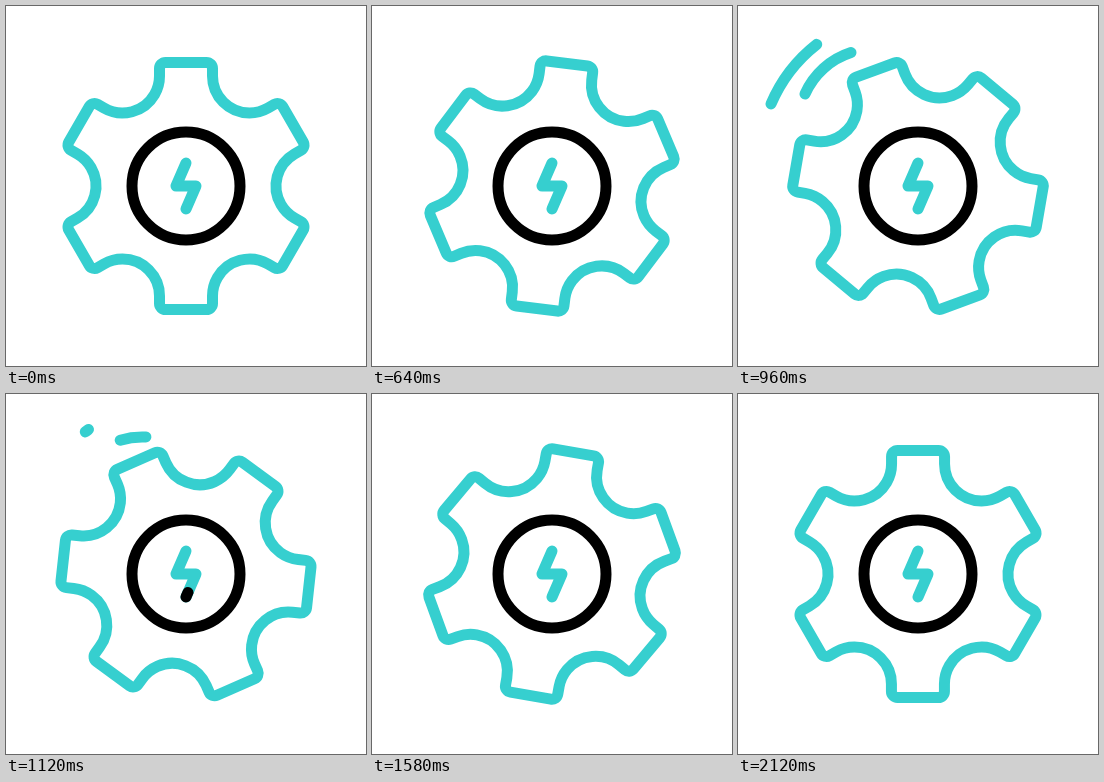
These frames come from a looping animation (360 px wide and 360 px high, 3 s). An HTML page with a canvas:

```html
<!DOCTYPE html>
<html lang="en">
<head>
<meta charset="utf-8">
<title>Power gear</title>
<style>
  html, body { margin: 0; width: 100%; height: 100%; overflow: hidden; background: #fff; }
  canvas { display: block; }
</style>
</head>
<body>
<canvas id="stage" width="360" height="360"></canvas>
<script>
const ctx = document.getElementById('stage').getContext('2d');
const LOOP = 3000, TEAL = '#36cfcf', BLACK = '#000';
const RAD = Math.PI / 180;

const bolt = new Path2D('M180 203L190 180H170L180 157');
const outerLine = new Path2D('M33 98A150 150 0 0 1 82.5 35.5');
const innerLine = new Path2D('M67 88A75.6 75.6 0 0 1 140 43');

// Eased progress from 0 to 1 between two times
function ease(t, from, to) {
  const u = Math.min(1, Math.max(0, (t - from) / (to - from)));
  return u * u * (3 - 2 * u);
}

// Wind up, spin four teeth on, overshoot and settle
function gearAngle(t) {
  return -10 * ease(t, 300, 470) + 260 * ease(t, 470, 1566) - 10 * ease(t, 1566, 2140);
}

function drawGear(angle) {
  const half = 26.5, top = -123.5, notchR = 37, notchY = -127;
  ctx.save();
  ctx.translate(180, 180);
  ctx.rotate(angle * RAD);
  ctx.beginPath();
  for (let i = 0; i < 6; i++) {
    ctx.lineTo(-half, -110);
    ctx.arcTo(-half, top, 0, top, 6);
    ctx.arcTo(half, top, half, -110, 6);
    ctx.rotate(30 * RAD);
    ctx.arc(0, notchY, notchR, 150 * RAD, 30 * RAD, true);
    ctx.rotate(30 * RAD);
  }
  ctx.closePath();
  ctx.stroke();
  ctx.restore();
}

// A dash that grows along the path, then shrinks away after it
function drawDash(path, length, t, start) {
  const head = ease(t, start, start + 190);
  const tail = ease(t, start + 158, start + 348);
  if (head <= tail) return;
  ctx.setLineDash([(head - tail) * length, 999]);
  ctx.lineDashOffset = -tail * length;
  ctx.stroke(path);
  ctx.setLineDash([]);
}

function draw(t) {
  ctx.fillStyle = '#fff';
  ctx.fillRect(0, 0, 360, 360);
  ctx.lineWidth = 11;
  ctx.lineCap = ctx.lineJoin = 'round';

  ctx.strokeStyle = TEAL;
  drawGear(gearAngle(t));
  drawDash(outerLine, 81, t, 800);
  drawDash(innerLine, 91, t, 840);
  ctx.stroke(bolt);

  ctx.strokeStyle = BLACK;
  drawDash(bolt, 70, t, 1090);
  ctx.beginPath();
  ctx.arc(180, 180, 54, 0, 2 * Math.PI);
  ctx.stroke();
}

const begin = performance.now();
function tick() {
  draw((performance.now() - begin) % LOOP);
  requestAnimationFrame(tick);
}
tick();
</script>
</body>
</html>
```
